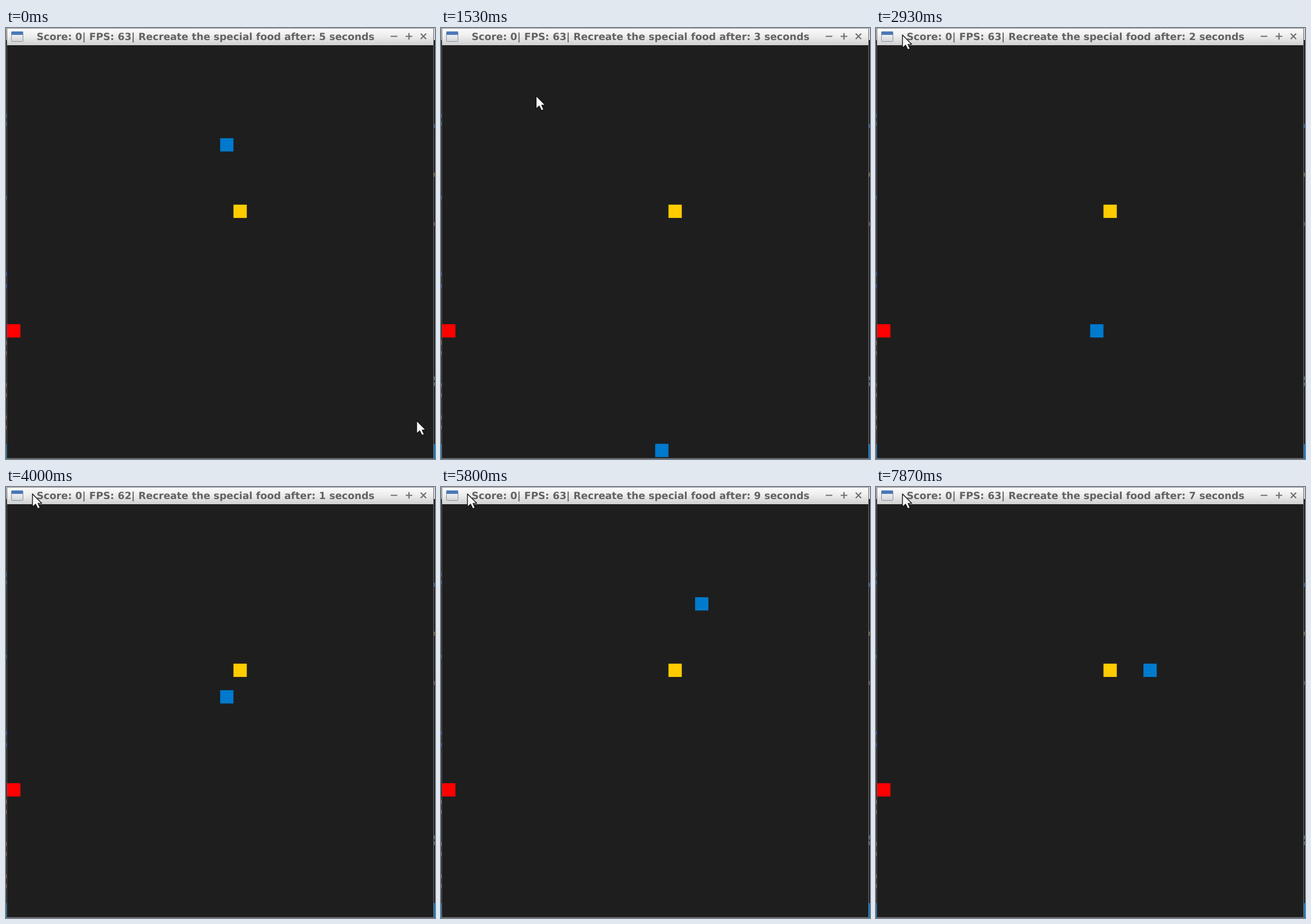
Write an HTML page that moves like this. It is 746 px wide and 751 px high and loops after 8000 ms.

```html
<!DOCTYPE html>
<html lang="en">
<head>
<meta charset="utf-8">
<title>Snake</title>
<style>
  html, body { margin: 0; width: 100%; height: 100%; overflow: hidden; background: #1e1e1e; }
  svg { display: block; width: 746px; height: 751px; }
  #title { font: bold 17.18px "DejaVu Sans", sans-serif; fill: #626262; text-rendering: geometricPrecision; white-space: pre; }
</style>
</head>
<body>
<svg viewBox="0 0 746 751">
  <defs>
    <linearGradient id="bar" x1="0" y1="0" x2="0" y2="1">
      <stop offset="0" stop-color="#fdfdfd"/>
      <stop offset=".5" stop-color="#ececec"/>
      <stop offset="1" stop-color="#d0d0d0"/>
    </linearGradient>
    <linearGradient id="pane" x1="0" y1="0" x2="0" y2="1">
      <stop offset="0" stop-color="#fafafa"/>
      <stop offset="1" stop-color="#d2d5d8"/>
    </linearGradient>
  </defs>

  <rect width="746" height="751" fill="#1e1e1e"/>
  <g id="behind"></g>

  <!-- window -->
  <rect x="1" width="1" height="751" fill="#5a5a5a"/>
  <rect x="743" width="1" height="751" fill="#707070"/>
  <rect x="2" y="30" width="741" height="720" fill="#1e1e1e"/>
  <g id="cells"></g>
  <rect x="1" y="749.6" width="743" height="1.4" fill="#777"/>
  <rect x="2" width="741" height="30" fill="url(#bar)"/>
  <rect x="1" width="743" height="1" fill="#8a8a8a"/>

  <!-- window icon -->
  <rect x="9.5" y="6.5" width="20" height="17" rx="1" fill="url(#pane)" stroke="#8590a0"/>
  <rect x="9.5" y="6" width="20" height="6" rx="1" fill="#4a78b8"/>

  <text id="title" x="53.2" y="20.5"></text>
  <path d="M669 14.5h11.5M695 14.5h11.5M700.75 8.7v11.5M721.2 9.8l9.4 9.4M730.6 9.8l-9.4 9.4"
        fill="none" stroke="#707070" stroke-width="2.2"/>

  <path id="cursor" d="M0 0V23L5.4 18L9.4 26L13.4 24.2L9.8 16.6L16 16.2Z"
        fill="#f6f6f6" stroke="#111" stroke-width="1.4" stroke-linejoin="round"/>
</svg>
<script>
const TICK = 1000 / 15, TICKS = 120;
const CELL = 23.15, LEFT = 2, TOP = 30, ROWS = 32;
const MOVE_START = 3.048, MOVE_EVERY = 2.409;
const SECOND_START = 8.2, SECOND_EVERY = 15.23;
const $ = id => document.getElementById(id);

function rect(parent, x, y, w, h, fill) {
  const r = document.createElementNS("http://www.w3.org/2000/svg", "rect");
  const attrs = { x, y, width: w, height: h, fill };
  for (const k in attrs) r.setAttribute(k, attrs[k]);
  parent.appendChild(r);
  return r;
}

function place(r, col, row) {
  r.setAttribute("x", LEFT + col * CELL);
  r.setAttribute("y", TOP + row * CELL);
}

function cell(col, row, fill) {
  const r = rect($("cells"), 0, 0, CELL, CELL, fill);
  place(r, col, row);
  return r;
}

// strips of the editor left and right of the window
function strip(x, w, marks) {
  const g = $("behind");
  rect(g, x, 0, w, 21, "#d8d8d8");
  rect(g, x, 725, w, 26, "#007acc");
  for (const [fill, ...tops] of marks)
    for (const y of tops) rect(g, x, y, w, 7, fill);
}
strip(0, 1, [
  ["#1f5f98", 149, 163, 292],
  ["#1c50e0", 425, 446],
  ["#8f5a30", 545, 563, 619, 636, 675, 692]
]);
strip(744, 2, [["#34597f", 167], ["#6a6040", 252], ["#634a48", 338], ["#59626a", 607, 617]]);

cell(0, 21, "#ff0000");
cell(17, 12, "#ffcc00");
const snake = cell(16, 7, "#007acc");

// moves, dx, dy; the snake rests one beat before some turns
const runs = [[32, 0, -1], [1, 0, 0], [7, 1, 0], [5, 0, 1], [1, 0, 0], [3, -1, 0]];

// tick, x, y
const path = [
  [0, 714, 684], [5, 443, 377], [16, 443, 377], [31, 55, 15], [33, 46, 12], [TICKS, 46, 12]
];

function snakeAt(k) {
  let moves = Math.max(0, Math.ceil((k + 1 - MOVE_START) / MOVE_EVERY));
  let col = 16, row = 7;
  for (const [count, dx, dy] of runs) {
    const n = Math.min(count, moves);
    col += dx * n;
    row += dy * n;
    moves -= n;
  }
  return [col, (row + ROWS) % ROWS];
}

function titleAt(k) {
  const n = Math.floor((k + 1 - SECOND_START) / SECOND_EVERY + 1);
  const fps = n % 3 === 1 ? 62 : 63;
  return `Score: 0| FPS: ${fps}| Recreate the special food after: ${(15 - n) % 10} seconds`;
}

function cursorAt(k) {
  const i = path.findIndex(p => p[0] > k);
  const [t0, x0, y0] = path[i - 1], [t1, x1, y1] = path[i];
  const rest = ((t1 - k) / (t1 - t0)) ** 2;
  return [x1 + (x0 - x1) * rest, y1 + (y0 - y1) * rest];
}

function draw(k) {
  place(snake, ...snakeAt(k));
  $("title").textContent = titleAt(k);
  $("cursor").setAttribute("transform", `translate(${cursorAt(k)})`);
}

const start = performance.now();
let last = -1;
function frame() {
  const t = Math.max(0, performance.now() - start);
  const k = Math.floor((t + 4) / TICK) % TICKS;
  if (k !== last) draw(last = k);
  requestAnimationFrame(frame);
}
frame();
</script>
</body>
</html>
```
